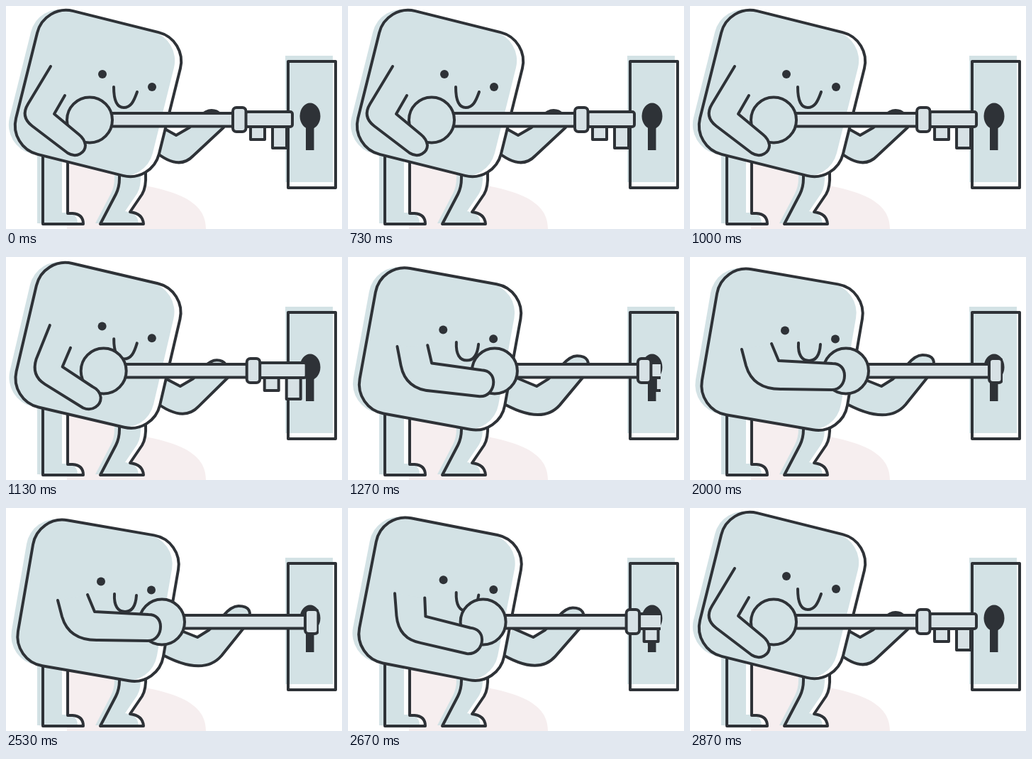
These frames come from a looping animation (474x314 px, 2.94 s). An HTML page with a canvas:

```html
<!DOCTYPE html>
<html lang="en">
<head>
<meta charset="utf-8">
<title>Key and lock</title>
<style>
html, body { margin: 0; width: 100%; height: 100%; overflow: hidden; background: #fff; }
canvas { display: block; filter: blur(0.5px); }
</style>
</head>
<body>
<canvas id="stage" width="474" height="314"></canvas>
<script>
const ctx = document.getElementById('stage').getContext('2d');
const LOOP = 2940, STEP = LOOP / 44;
const INK = '#2e3237', FILL = '#d3e2e5', METAL = '#d7e1e5', PINK = '#f6eeef';
const TRAVEL = 102, LOCK_EDGE = 441;

const mix = (a, b, p) => a + (b - a) * p;
const ease = t => {
  t = Math.min(1, Math.max(0, t));
  return t < 0.5 ? 4 * t ** 3 : 1 - (2 - 2 * t) ** 3 / 2;
};

// 0 = key outside the lock, 1 = key fully inserted
function insertion(time) {
  return ease((time - 983) / 420) - ease((time - 2530) / 343);
}

// Point mover from rest pose to inserted pose, bowed by (bowX, bowY) halfway
function poser(p) {
  const bow = 4 * p * (1 - p);
  return (x0, y0, x1, y1, bowX = 0, bowY = 0) =>
    [mix(x0, x1, p) + bowX * bow, mix(y0, y1, p) + bowY * bow];
}

function stroke(path) {
  ctx.strokeStyle = INK;
  ctx.stroke(path);
}

function fill(path, color, dx = 0, dy = 0) {
  ctx.save();
  ctx.translate(dx, dy);
  ctx.fillStyle = color;
  ctx.fill(path);
  ctx.restore();
}

function solid(path, color) {
  fill(path, color);
  stroke(path);
}

// Outline with its colour printed slightly out of register
function misprint(path, dx, dy) {
  fill(path, '#fff');
  fill(path, FILL, dx, dy);
  stroke(path);
}

function roundRect(x, y, w, h, r) {
  const path = new Path2D();
  path.roundRect(x, y, w, h, r);
  return path;
}

function disc(x, y, rx, ry = rx) {
  const path = new Path2D();
  path.ellipse(x, y, rx, ry, 0, 0, Math.PI * 2);
  return path;
}

function drawGround() {
  fill(new Path2D('M86 222C140 226 172 246 201 254C222 258 240 264 252 270C272 281 282 294 282 314H86Z'), PINK);
}

function drawLegs() {
  misprint(new Path2D('M52 200V307H109Q109 293 94 292H87V200'), -8, -1);
  misprint(new Path2D('M160 225V243Q160 255 155 265L133 307H194Q193 292 175 290L192 265Q198 255 197 236V225'), -7, -1);
}

function drawBackArm(p) {
  const pt = poser(p);
  const path = new Path2D();
  path.moveTo(...pt(208, 203, 214, 203));
  path.quadraticCurveTo(...pt(243, 233, 277, 239), ...pt(264, 211, 304, 208));
  path.lineTo(...pt(307, 171, 341, 162));
  path.quadraticCurveTo(...pt(306, 147, 351, 138), ...pt(290, 147, 328, 138));
  path.quadraticCurveTo(...pt(282, 147, 318, 138), ...pt(274, 155, 306, 152));
  path.lineTo(...pt(259, 171, 286, 172));
  path.lineTo(...pt(240, 182, 270, 182));
  path.lineTo(...pt(215, 168, 240, 170));
  solid(path, FILL);
}

function drawBody(p) {
  const half = 104;
  const pose = new DOMMatrix()
    .translate(130, mix(123, 130.3, p))
    .rotate(mix(14, 9.8, p));
  const path = new Path2D();
  path.addPath(roundRect(-half, -half, half * 2, half * 2, 42), pose);
  misprint(path, -9, -1);
}

function drawFace(p) {
  const pt = poser(p);
  fill(disc(...pt(136, 96, 134, 103.5), 6), INK);
  fill(disc(...pt(206, 114, 205, 115.5), 6), INK);
  const smile = new Path2D();
  smile.moveTo(...pt(152, 114, 153, 121));
  smile.bezierCurveTo(...pt(152, 134, 152, 138), ...pt(157, 143, 158, 146), ...pt(166, 143, 168, 146));
  smile.bezierCurveTo(...pt(176, 143, 178, 146), ...pt(180, 135, 183, 138), ...pt(185, 121, 184, 123));
  stroke(smile);
}

function drawDoor() {
  misprint(roundRect(398, 78, 67, 178, 0), -4, -8);
  fill(disc(429, 155, 14.5, 18.5), INK);
  fill(roundRect(423, 168, 11.5, 35, 0), INK);
}

function drawKey(p) {
  ctx.save();
  ctx.beginPath();
  ctx.rect(0, 0, LOCK_EDGE, 314);
  ctx.clip();
  ctx.translate(TRAVEL * p, 0);
  solid(roundRect(345, 168, 20, 20, 0), METAL);
  solid(roundRect(376, 168, 20, 32, 0), METAL);
  solid(roundRect(338, 149, 66, 21, 3), METAL);
  solid(roundRect(140, 151, 185, 18.5, 0), METAL);
  solid(roundRect(320, 143, 18.5, 34, 5), METAL);
  solid(disc(118, 160.5, 32), FILL);
  ctx.restore();
}

function drawFrontArm(p) {
  const pt = poser(p);
  const path = new Path2D();
  path.moveTo(...pt(63, 85, 73, 130, -5, 4));
  path.lineTo(...pt(31, 138, 79, 153, 4, 4));
  path.quadraticCurveTo(...pt(20, 156, 89, 187, 3, 8), ...pt(37, 169, 130, 186, 0, 11));
  path.lineTo(...pt(87, 207, 200, 187, 0, 15));
  path.bezierCurveTo(
    ...pt(100, 215, 212, 187, 1, 14),
    ...pt(112, 206, 218, 177, 2, 13),
    ...pt(112, 196, 218, 167, 2, 12));
  path.bezierCurveTo(
    ...pt(111, 189, 218, 157, 2, 12),
    ...pt(108, 185, 212, 150, 1, 12),
    ...pt(103, 181, 201, 150, 0, 12));
  path.lineTo(...pt(68, 152, 125, 146, 1, 6));
  path.lineTo(...pt(83, 126, 115, 122, 3, 4));
  solid(path, FILL);
}

function draw(now) {
  const frame = Math.floor((now % LOOP + 8) / STEP) % 44;
  const p = insertion(frame * STEP);
  ctx.fillStyle = '#fff';
  ctx.fillRect(0, 0, 474, 314);
  ctx.lineWidth = 4;
  ctx.lineCap = ctx.lineJoin = 'round';
  drawGround();
  drawLegs();
  drawBackArm(p);
  drawBody(p);
  drawFace(p);
  drawDoor();
  drawKey(p);
  drawFrontArm(p);
}

const start = performance.now();
function tick() {
  draw(performance.now() - start);
  requestAnimationFrame(tick);
}
tick();
</script>
</body>
</html>
```
